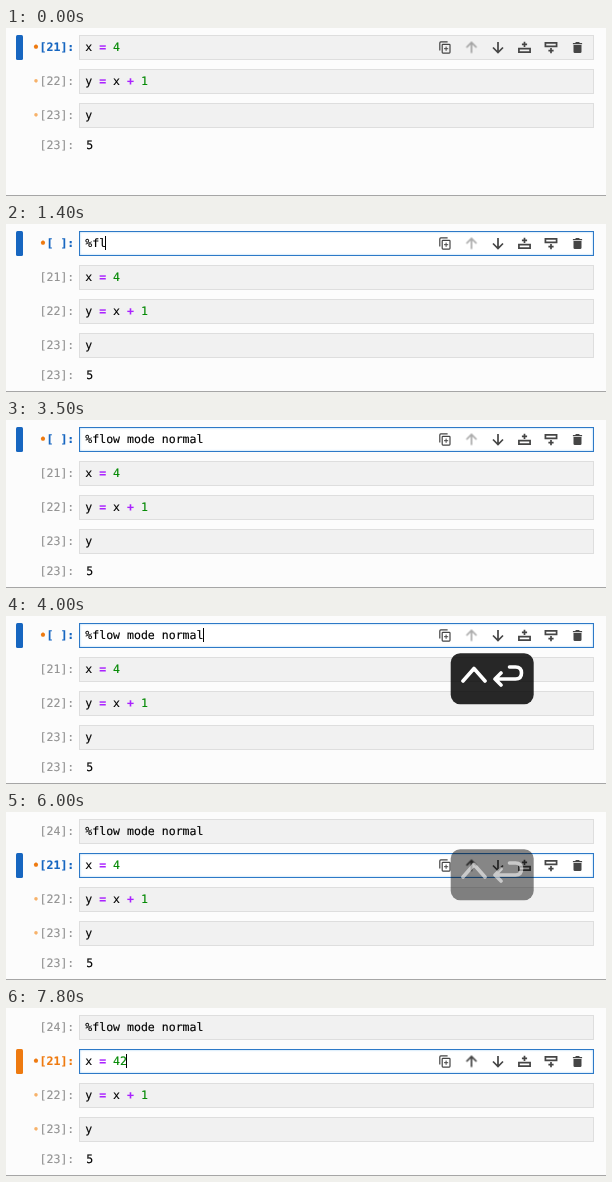
Recreate the animation shown at these times as an HTML page. Size 600 by 168 pixels, loop 8000 ms.

```html
<!DOCTYPE html>
<html lang="en">
<head>
<meta charset="utf-8">
<title>Notebook cells</title>
<style>
  :root {
    --blue: #1766c0; --orange: #ee7a10; --grey: #929292;
    --plain: inset 0 0 0 1px #dedede;
    --focus: inset 0 0 0 1px #2d79c7, inset 0 0 2px 1px #8fc4f0;
  }
  html, body { margin: 0; width: 100%; height: 100%; overflow: hidden; }
  body {
    position: relative; background: #fcfcfc; color: #000;
    font: 11.55px/25px "DejaVu Sans Mono", "Liberation Mono", monospace;
    text-rendering: geometricPrecision; white-space: pre;
    -webkit-text-stroke: .15px;
  }
  .row, .prompt, .cell, .code, .bar, svg, .edge, #stack, #select { position: absolute; }
  #stack, #select, svg { left: 0; top: 0; }
  .row { left: 0; width: 600px; height: 25px; }
  .prompt { right: 531.7px; color: var(--grey); }
  .dot { color: #f6b26b; }
  .cell { left: 73px; width: 514.5px; height: 25px; background: #f1f1f1; box-shadow: var(--plain); }
  .code { left: 6.3px; height: 25px; }
  .clip { display: block; width: 100%; overflow: hidden; }
  .caret::after {
    content: ""; position: absolute; left: calc(100% - .8px); top: 5px;
    width: 1.2px; height: 14px; background: #000; animation: inherit; animation-name: var(--blink);
  }
  b { color: #a2f; }
  i { color: #080; font-style: normal; }
  .bar { left: 9.6px; top: 7px; width: 7px; height: 25px; border-radius: 1.5px; background: var(--blue); }
  .edge { left: 0; top: 167px; width: 100%; height: 1px; background: #a6a6a6; }
  .icons { fill: none; stroke: #454545; stroke-width: 1.7; }
  .thin { stroke-width: 1.2; stroke-linejoin: round; }
  .solid { fill: #454545; stroke: none; }
  .glyph { fill: none; stroke: #fff; stroke-width: 3.6; stroke-linecap: round; stroke-linejoin: round; }

  /* one shared 8 s clock */
  .t { animation: 8s step-end -10ms infinite; }
  #stack { animation-name: push; }
  #select { animation-name: down; }
  .bar { animation-name: bar; }
  #fresh { animation-name: fresh; }
  #blank { animation-name: blank; color: var(--blue); font-weight: bold; }
  #blank .dot { color: var(--orange); animation-name: mark; }
  #done { animation-name: done; }
  #fresh .cell { animation-name: editNew; }
  #magic { animation-name: type; --blink: blinkNew; }
  #first { animation-name: first; }
  #first .dot { animation-name: dotFirst; }
  #stack .other { animation-name: dots; }
  #edited { animation-name: editFirst; }
  #assign { animation-name: digit; --blink: blinkFirst; }
  #up { animation-name: up; }
  .key { animation-name: key; animation-timing-function: linear; }

  @keyframes push { 0% { transform: none } 3.75%, 100% { transform: translateY(34px) } }
  @keyframes down { 0% { transform: none } 61.25%, 100% { transform: translateY(34px) } }
  @keyframes bar { 0% { background: var(--blue) } 83.75%, 100% { background: var(--orange) } }
  @keyframes fresh { 0% { opacity: 0 } 3.75%, 100% { opacity: 1 } }
  @keyframes blank { 0% { opacity: 1 } 51.25%, 100% { opacity: 0 } }
  @keyframes mark { 0% { opacity: 0 } 7.5%, 100% { opacity: 1 } }
  @keyframes done {
    0% { opacity: 0; color: var(--blue); font-weight: 700 }
    51.25% { opacity: 1; color: var(--blue); font-weight: 700 }
    61.25%, 100% { opacity: 1; color: var(--grey); font-weight: 400 }
  }
  @keyframes editNew {
    0% { background: #f1f1f1; box-shadow: var(--plain) }
    7.5% { background: #fff; box-shadow: var(--focus) }
    51.25%, 100% { background: #f1f1f1; box-shadow: var(--plain) }
  }
  @keyframes editFirst {
    0% { background: #f1f1f1; box-shadow: var(--plain) }
    70%, 100% { background: #fff; box-shadow: var(--focus) }
  }
  @keyframes type {
    0% { width: 0 } 13.75% { width: 1ch } 16.25% { width: 2ch } 17.5% { width: 3ch }
    20% { width: 4ch } 21.25% { width: 6ch } 23.75% { width: 7ch } 25% { width: 8ch }
    27.5% { width: 9ch } 28.75% { width: 10ch } 30% { width: 11ch } 31.25% { width: 12ch }
    32.5% { width: 13ch } 33.75% { width: 14ch } 35% { width: 15ch } 36.25% { width: 16ch }
    37.5%, 100% { width: 17ch }
  }
  @keyframes blinkNew {
    0% { opacity: 0 } 7.5% { opacity: 1 } 43.75% { opacity: 0 }
    50% { opacity: 1 } 51.25%, 100% { opacity: 0 }
  }
  @keyframes blinkFirst {
    0% { opacity: 0 } 70% { opacity: 1 } 75% { opacity: 0 } 82.5% { opacity: 1 }
    91.25% { opacity: 0 } 97.5%, 100% { opacity: 1 }
  }
  @keyframes digit { 0% { width: 5ch } 83.75%, 100% { width: 6ch } }
  @keyframes first {
    0% { color: var(--blue); font-weight: 700 }
    3.75% { color: var(--grey); font-weight: 400 }
    61.25% { color: var(--blue); font-weight: 700 }
    83.75%, 100% { color: var(--orange); font-weight: 700 }
  }
  @keyframes dotFirst {
    0% { color: var(--orange); opacity: 1 }
    3.75% { color: var(--orange); opacity: 0 }
    61.25%, 100% { color: var(--orange); opacity: 1 }
  }
  @keyframes dots { 0% { opacity: 1 } 3.75% { opacity: 0 } 61.25%, 100% { opacity: 1 } }
  @keyframes up { 0% { opacity: .45 } 61.25%, 100% { opacity: 1 } }
  @keyframes key {
    0%, 49.99% { opacity: 0 } 50%, 71.25% { opacity: 1 }
    75% { opacity: .6 } 77.5%, 100% { opacity: 0 }
  }
</style>
</head>
<body>
<div id="stack" class="t">
  <div class="row" style="top:7px"><span id="first" class="prompt t"><span class="dot t">•</span>[21]:</span><div id="edited" class="cell t"><div id="assign" class="code caret t"><span class="clip">x <b>=</b> <i>42</i></span></div></div></div>
  <div class="row" style="top:41px"><span class="prompt"><span class="dot other t">•</span>[22]:</span><div class="cell"><div class="code">y <b>=</b> x <b>+</b> <i>1</i></div></div></div>
  <div class="row" style="top:75px"><span class="prompt"><span class="dot other t">•</span>[23]:</span><div class="cell"><div class="code">y</div></div></div>
  <div class="row" style="top:105px"><span class="prompt">[23]:</span><div class="code" style="left:80.3px">5</div></div>
</div>

<div id="fresh" class="row t" style="top:7px"><span id="blank" class="prompt t"><span class="dot t">•</span>[ ]:</span><span id="done" class="prompt t">[24]:</span><div class="cell t"><div id="magic" class="code caret t"><span class="clip">%flow mode normal</span></div></div></div>

<div id="select" class="t">
  <div class="bar t"></div>
  <svg class="icons" width="600" height="40">
    <g class="thin" transform="translate(439 19.5)">
      <path d="M-5.2 3V-4.6Q-5.2-5.6-4.2-5.6H2.6"/>
      <rect x="-2.8" y="-3.2" width="7.8" height="8.8" rx=".8"/>
      <path d="M1.1-.9V3.3M-1 1.2H3.2" stroke-width="1"/>
    </g>
    <path id="up" class="t" transform="translate(465.5 19.5)" d="M0 5.5V-4.5M-5 0L0-5L5 0"/>
    <path transform="translate(492 19.5)" d="M0-5.5V4.5M-5 0L0 5L5 0"/>
    <path transform="translate(518.5 19.5)" d="M-5.6 1.2H5.6V4.6H-5.6ZM0-5.8V-.6M-2.6-3.2H2.6"/>
    <path transform="translate(545 19.5)" d="M-5.6-4.6H5.6V-1.2H-5.6ZM0 .6V5.8M-2.6 3.2H2.6"/>
    <path class="solid" transform="translate(571.5 19.5)" d="M-4.6-4.6H-2.3L-1.6-5.4H1.6L2.3-4.6H4.6V-3.3H-4.6ZM-4-2.5H4V4.2Q4 5.5 2.7 5.5H-2.7Q-4 5.5-4 4.2Z"/>
  </svg>
</div>

<div class="edge"></div>
<svg width="600" height="168">
  <rect class="key t" x="444.7" y="37.3" width="83" height="51" rx="9.5" fill="#000" fill-opacity=".84"/>
  <path class="key glyph t" d="M457 65L468 52.5L479 65M503.5 51H509.5Q515.5 51 515.5 57T509.5 63H489M495 57L489 63L495 69"/>
</svg>
</body>
</html>
```
